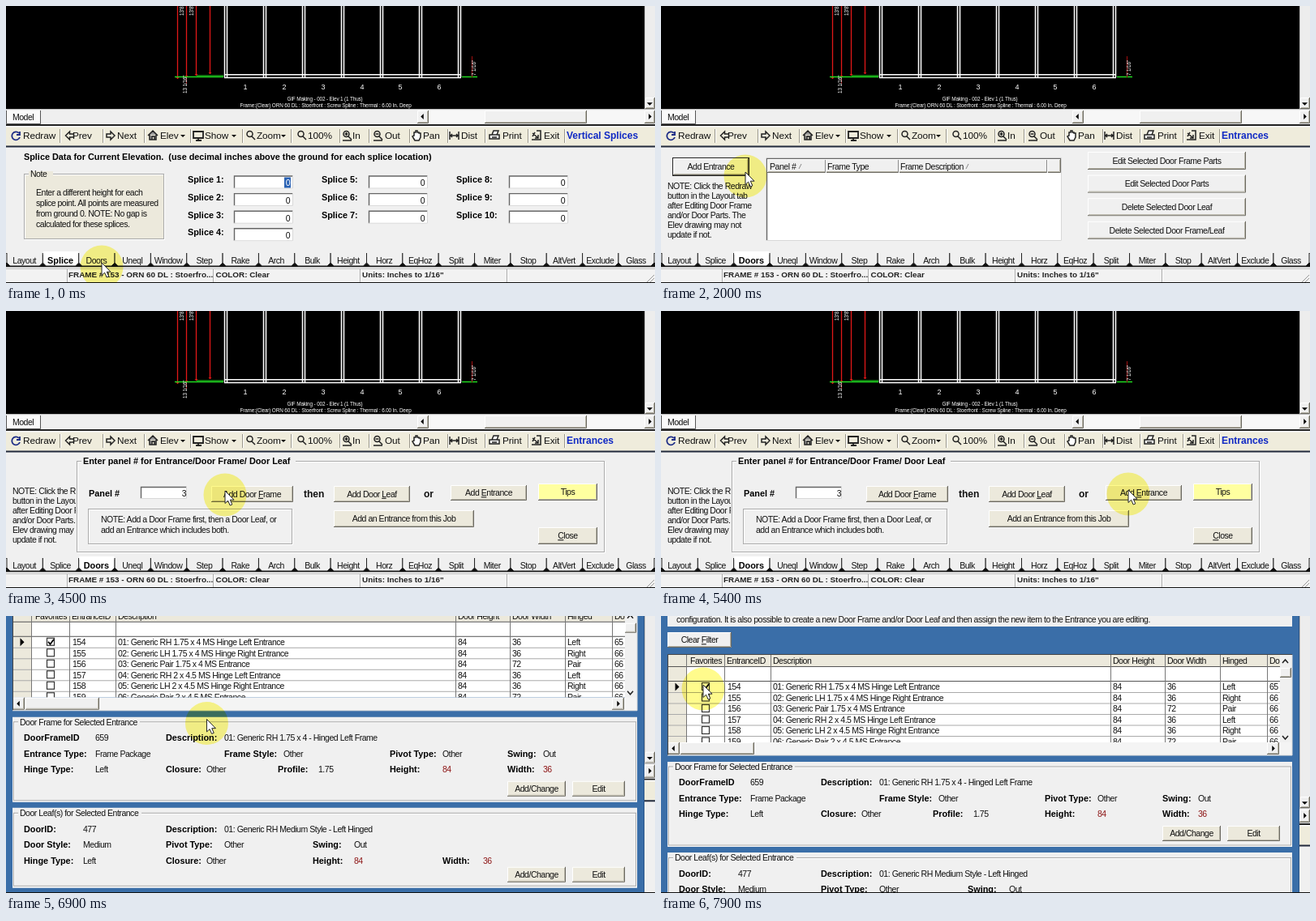
These frames come from a looping animation (800 by 342 pixels, 8000 ms). An HTML page:

```html
<!DOCTYPE html>
<html lang="en">
<head>
<meta charset="utf-8">
<title>Adding an entrance</title>
<style>
html, body { margin: 0; width: 100%; height: 100%; overflow: hidden; background: #f0f0f0; }
svg { display: block; width: 800px; height: 342px; }
text { font: 10.5px "Liberation Sans", Arial, sans-serif; letter-spacing: -.47px; fill: #111; white-space: pre; }
.b { font-weight: bold; font-size: 10.85px; letter-spacing: 0; fill: #000; }
.big { font-weight: bold; font-size: 12px; letter-spacing: 0; }
.status { font-weight: bold; font-size: 9.9px; letter-spacing: 0; fill: #222; }
.tool { font-size: 11.8px; letter-spacing: -.1px; }
.title { font-weight: bold; font-size: 12px; letter-spacing: 0; fill: #1029c4; }
.cad { font-size: 9px; letter-spacing: 0; fill: #fff; }
.tiny { font-size: 6.4px; letter-spacing: -.15px; fill: #fff; }
.red { fill: #8c1414; }
.inv { fill: #fff; }
.u { text-decoration: underline; }
.icon { fill: none; stroke: #222; stroke-width: 1.5; }
</style>
</head>
<body>
<svg id="stage" viewBox="0 0 800 342"></svg>
<script>
const LOOP = 8000;
const DOORS_AT = 500, DIALOG_AT = 2350, TYPED_AT = 4300, WINDOW_AT = 5900;
const FACE = '#ece9dc', PAGE = '#f0f0f0', BLUE = '#3a6ea8';
const SYSTEM = 'ORN 60 DL';

const rect = (x, y, w, h, fill, extra = '') =>
  `<rect x="${x}" y="${y}" width="${w}" height="${h}" fill="${fill}" ${extra}/>`;
const path = (d, stroke = '#000', fill = 'none', extra = '') =>
  `<path d="${d}" stroke="${stroke}" fill="${fill}" ${extra}/>`;
const group = (id, body, extra = '') => `<g id="${id}" ${extra}>${body}</g>`;
const repeat = (list, draw) => list.map(draw).join('');

// y is the middle of the line; an underscore underlines the next letter
const text = (x, y, s, cls = '', anchor = 'start') =>
  `<text x="${x}" y="${y + 3.8}" class="${cls}" text-anchor="${anchor}">` +
  s.replace(/_(.)/, '<tspan class="u">$1</tspan>') + '</text>';

const tri = (x, y, dir, r = 4, fill = '#000') =>
  `<path d="M${-r / 2},${-r}L${r / 2},0L${-r / 2},${r}Z" fill="${fill}" transform="translate(${x} ${y}) rotate(${dir})"/>`;

function raised(x, y, w, h, fill = FACE) {
  return rect(x, y, w, h, fill) +
    path(`M${x + .5},${y + h - .5}V${y + .5}H${x + w - .5}`, '#fff') +
    path(`M${x},${y + h - .5}H${x + w - .5}V${y}`, '#6c6a62') +
    path(`M${x + 1},${y + h - 1.5}H${x + w - 1.5}V${y + 1}`, '#b8b5a8');
}
function sunken(x, y, w, h, fill = '#fff') {
  return rect(x, y, w, h, fill) +
    path(`M${x + .5},${y + h - .5}V${y + .5}H${x + w - .5}`, '#666', 'none', 'stroke-width="1.4"') +
    path(`M${x},${y + h - .5}H${x + w - .5}V${y}`, '#d8d8d8');
}
const button = (x, y, w, h, label, fill) =>
  raised(x, y, w, h, fill) + text(x + w / 2, y + h / 2, label, '', 'middle');

function etched(x, y, w, h, legend = '', cls = '', legendWidth = 0, bg = PAGE) {
  const box = `x="${x + .5}" y="${y + .5}" width="${w}" height="${h}" fill="none"`;
  return `<rect ${box} stroke="#fff" transform="translate(1 1)"/><rect ${box} stroke="#aaa"/>` +
    (legend ? rect(x + 6, y - 3, legendWidth, 7, bg) + text(x + 8, y + .5, legend, cls) : '');
}
const lines = (x, y, step, list) => repeat(list, (s, i) => text(x, y + i * step, s));
const pairs = (y, list) => repeat(list, ([x, label, vx, value, cls]) =>
  text(x, y, label, 'b') + text(vx, y, value, cls));

function drawing() {
  const dims = repeat([[211, 90], [222, 88], [234, 86], [251, 84]], ([x, y]) =>
    path(`M${x + .5},0V${y}`, '#e01818', 'none', 'stroke-width="1.3"') + tri(x + .5, y - 1, 90, 2, '#e01818'));
  const upright = (x, y, s) => `<text class="tiny" transform="translate(${x} ${y}) rotate(-90)">${s}</text>`;
  const white = d => path(d, '#fff', 'none', 'stroke-width="1.5"');
  const mullion = i => 269.5 + 48 * i;
  return rect(0, 0, 787, 127, '#000') + dims +
    path('M208,87.5H268M562,87.5H581', '#20d820', 'none', 'stroke-width="1.4"') + path('M235,86H268', '#20d820') +
    path('M222.5,88V96M574.5,62V88', '#a01010') +
    upright(219, 12, "13'8 1/16\"") + upright(231, 12, "13'8\"") +
    upright(223, 108, '13 1/16"') + upright(579, 86, '7 1/16"') +
    repeat([0, 1, 2, 3, 4, 5, 6].map(mullion), x => white(`M${x},0V88M${x + 3},0V88`)) +
    white('M269,84.8H561M269,88.4H561') +
    repeat([295, 343, 391, 439, 486, 534], (x, i) => text(x, 99.5, `${i + 1}`, 'cad', 'middle')) +
    text(393, 113.5, 'GIF Making - 002 - Elev 1 (1 Thus)', 'tiny', 'middle') +
    text(394, 121, `Frame:(Clear) ${SYSTEM} : Stoerfront : Screw Spline : Thermal : 6.00 In. Deep`, 'tiny', 'middle');
}

function scrollbars() {
  return rect(787, -140, 13, 268, '#ededed') + path('M787.5,-140V128', '#bbb') +
    raised(788, 113, 12, 14, PAGE) + tri(793.5, 121, 90, 3.5) +
    rect(0, 127, 800, 20, '#efefef') + path('M0,127.5H800', '#bbb') +
    path('M.5,129V145.5H42.5V129', '#555', '#fafafa') + text(21, 137, 'Model', '', 'middle') +
    raised(507, 129, 14, 16, PAGE) + tri(513, 136.5, 180, 3.5) +
    rect(521, 129, 266, 16, '#f7f7f7') + raised(590, 129, 126, 16, PAGE) +
    raised(787, 129, 13, 16, PAGE) + tri(794, 136.5, 0, 3.5);
}

function toolbar() {
  const icon = (x, d, extra = '') => `<path class="icon" transform="translate(${x} 160)" d="${d}" ${extra}/>`;
  const lens = 'M1,1L5,5M2,-2A3.5,3.5 0 1 1 -5,-2A3.5,3.5 0 1 1 2,-2';
  const arrow = 'M5,-2H0V-5L-5,0L0,5V2H5Z';
  const items = [[21, 'Redraw'], [82, 'Prev'], [137, 'Next'], [190, 'Elev'], [245, 'Show'], [309, 'Zoom'],
    [372, '100%'], [427, 'In'], [467, 'Out'], [514, 'Pan'], [561, 'Dist'], [612, 'Print'], [663, 'Exit']];
  return rect(0, 146, 800, 2, '#222') + rect(0, 148, 800, 25, '#efecdc') + rect(0, 148, 800, 1.5, '#fff') +
    rect(0, 172.5, 800, 2, '#222a3c') +
    repeat([66, 119, 170, 227, 291, 351, 411, 447, 497, 544, 590, 643, 688], x =>
      path(`M${x + .5},152V169`, '#9a978a') + path(`M${x + 1.5},152V169`, '#fff')) +
    repeat(items, ([x, s]) => text(x, 160, s, 'tool')) +
    repeat([218, 281, 342], x => tri(x, 160.5, 90, 3)) +
    icon(12, 'M4,-3A5,5 0 1 0 5,2M5,-5V-1H1', 'style="stroke:#1c2c86;stroke-width:1.8"') +
    icon(78.5, arrow) + icon(129, 'M-5,-2H0V-5L5,0L0,5V2H-5Z') +
    icon(181, 'M-6,0L0,-6L6,0M-4,-1V5H4V-1M-1,5V1H2V5', 'style="fill:#999"') +
    icon(237, 'M-6,-5H6V3H-6ZM-3,6H4M0,3V6', 'style="stroke-width:1.8"') +
    icon(302, lens) + icon(365, lens) + icon(421, lens + 'M-3.5,-2H.5M-1.5,-4V0M-6,6H5') +
    icon(459, lens + 'M-3.5,-2H.5M-6,6H5') +
    icon(506, 'M-2,6L-5,1L-3,0V-4H-1V-6H1V-4H3V-3H5V2L3,6Z', 'style="fill:#fff"') +
    icon(553, 'M-6,-5V5M5,-5V5M-5,0H4M-3,-2L-5,0L-3,2M2,-2L4,0L2,2') +
    icon(602, 'M-6,-1H6V4H-6ZM-3,-1L-1,-6H5L3,-1M-3,2H3', 'style="fill:#fff"') +
    icon(654, 'M-6,5H5V-6H0M-5,-3L2,3M2,-1V3H-2M-5,1L-2,-4');
}

const TABS = 'Layout Splice Doors Uneql Window Step Rake Arch Bulk Height Horz EqHoz Split Miter Stop AltVert Exclude Glass'.split(' ');
function tabs(active) {
  const step = 44.35;
  return rect(0, 304, 800, 14, PAGE) + rect(0, 317, 800, 5.5, '#111') + path('M0,305.5H800', '#555') +
    repeat(TABS, (name, i) => {
      const on = i === active, x = i * step + 1, end = i === 17 ? 799 : x + step;
      return path(`M${x},305V317L${x + 4},321H${end - 4}L${end},317V305`, '#222', on ? '#fff' : PAGE) +
        (on ? rect(x + .5, 303, end - x - 1, 4, '#fff') : '') +
        text((x + end) / 2 - .5, 313.8, name, on ? 'b' : '', 'middle');
    });
}

function statusBar() {
  return rect(0, 322.5, 800, 20, '#f2f2f2') + path('M0,324.5H800', '#c4c4c4') +
    repeat([76, 256, 437, 618], x => path(`M${x - .5},325V341`, '#aaa') + path(`M${x + .5},325V341`, '#fff')) +
    text(77, 331.5, `FRAME # 153 - ${SYSTEM} : Stoerfro...`, 'status') +
    text(258.5, 331.5, 'COLOR: Clear', 'status') + text(439, 331.5, 'Units: Inches to 1/16"', 'status') +
    path('M790,341L799,332M794,341L799,336', '#999');
}

function splicePage() {
  const columns = [[224, 281, 4], [389, 447, 3], [555, 620, 3]];
  let n = 0, out = '';
  for (const [x, fx, count] of columns)
    for (let r = 0; r < count; r++) {
      const y = 215.5 + r * 21.6, first = ++n === 1;
      out += text(x, y - 1, `Splice ${n}:`, 'b') + sunken(fx, y - 6, 73, 16) +
        (first ? rect(fx + 62, y - 4, 8, 13, '#2a62b4') : '') +
        text(fx + 69, y + 3, '0', first ? 'inv' : '', 'end');
    }
  return text(22, 186, 'Splice Data for Current Elevation.  (use decimal inches above the ground for each splice location)', 'b') +
    rect(22, 207, 173, 81, FACE) + etched(22, 207, 172, 80, 'Note', '', 30, FACE) +
    lines(37, 230, 13, ['Enter a different height for each', 'splice point. All points are measured',
      'from ground 0. NOTE: No gap is', 'calculated for these splices.']) + out + text(691, 160, 'Vertical Splices', 'title');
}

function doorsPage() {
  const edits = ['Edit Selected Door Frame Parts', 'Edit Selected Door Parts', 'Delete Selected Door Leaf', 'Delete Selected Door Frame/Leaf'];
  return text(691, 160, 'Entrances', 'title') +
    lines(8, 222, 12, ['NOTE: Click the Redraw', 'button in the Layout tab', 'after Editing Door Frame',
      'and/or Door Parts. The', 'Elev drawing may not', 'update if not.']) +
    group('entrances', rect(14, 187, 95, 23, '#222') + button(15, 188, 93, 21, 'Add Entrance', PAGE) +
      sunken(130, 188, 364, 102) + raised(131, 189, 362, 17, PAGE) +
      repeat([202, 292, 475], x => path(`M${x + .5},190V206`, '#888') + path(`M${x + 1.5},190V206`, '#fff')) +
      text(134, 198, 'Panel #') + text(205, 198, 'Frame Type') + text(295, 198, 'Frame Description') +
      path('M170,201L173,195M376,201L379,195', '#888') +
      repeat(edits, (s, i) => button(526, 180 + i * 28.6, 195, 22, s, PAGE)));
}

function panelDialog() {
  return rect(86, 176, 654, 125, PAGE) + etched(87, 185, 650, 112, 'Enter panel # for Entrance/Door Frame/ Door Leaf', 'b', 264) +
    text(102, 225, 'Panel #', 'b') + sunken(166, 217, 57, 15) +
    group('zero', rect(216, 218, 6, 13, '#2a62b4') + text(222, 225, '0', 'inv', 'end')) +
    group('three', text(222, 225.5, '3', '', 'end')) +
    button(253, 216, 101, 20, 'Add Door _Frame') + text(367, 226, 'then', 'big') +
    button(404, 216, 94, 20, 'Add Door _Leaf') + text(515, 226, 'or', 'big') +
    button(548, 215, 94, 19, 'Add _Entrance') + button(656, 213, 73, 21, 'Tips', '#ffffa0') +
    button(404, 246, 173, 21, 'Add an Entrance from this Job') + button(656, 267, 73, 21, '_Close') +
    etched(101, 244, 251, 43) + lines(117, 257, 13, ['NOTE: Add a Door Frame first, then a Door Leaf, or', 'add an Entrance which includes both.']);
}

function grid() {
  const stops = [31, 78, 135, 554, 621, 689, 747];
  const heads = [[36, 'Favorites'], [81, 'EntranceID'], [138, 'Description'], [557, 'Door Height'], [624, 'Door Width'], [692, 'Hinged'], [750, 'Do']];
  const sizes = ['1.75 x 4', '2 x 4.5'];
  const kinds = [['RH', ' Hinge Left', 36, 'Left'], ['LH', ' Hinge Right', 36, 'Right'], ['Pair', '', 72, 'Pair']];
  let rows = '';
  for (let i = 0; i < 6; i++) {
    const y = -22.5 + i * 13.5, [hand, hinge, width, side] = kinds[i % 3];
    rows += path(`M8,${y + 7}H763`, '#aaa') + rect(50.5, y - 5, 9, 9, '#fff', 'stroke="#333" stroke-width="1.2"') +
      text(82, y, `${154 + i}`) +
      text(138, y, `0${i + 1}: Generic ${hand} ${sizes[i / 3 | 0]} MS${hinge} Entrance`) +
      text(557, y, '84') + text(624, y, `${width}`) + text(692, y, side) + text(750, y, i ? '66' : '65');
  }
  const body = rect(8, -62, 755, 108, '#fff') + rect(8, -62, 755, 14, FACE) + rect(8, -62, 23, 108, FACE) +
    path('M8,-47.5H763M8,-29.5H763', '#555') + rows +
    repeat(stops, x => path(`M${x + .5},-62V46`, '#777')) +
    repeat(heads, ([x, s]) => text(x, -55, s)) +
    tri(20, -22.5, 0, 5) + path('M52,-23L54.5,-20L59,-26', '#000', 'none', 'stroke-width="1.8"');
  return `<clipPath id="cells"><rect x="8" y="-62" width="755" height="108"/></clipPath><g clip-path="url(#cells)">${body}</g>` +
    rect(763, -62, 15, 124, PAGE) + raised(763, -46, 14, 12, PAGE) +
    path('M766,-52L769.5,-56L773,-52M766,38L769.5,42L773,38', '#222', 'none', 'stroke-width="1.5"') +
    rect(8, 46, 770, 16, '#f4f4f4') + raised(8, 46, 15, 15, PAGE) + tri(15, 53.5, 180, 3.5) +
    raised(24, 46, 91, 15, PAGE) + raised(747, 46, 15, 15, PAGE) + tri(755, 53.5, 0, 3.5) +
    path('M8.5,62V-62.5H778', '#444') + path('M8,62H778V-62', '#ddd');
}

function entranceWindow() {
  const actions = y => button(618, y, 72, 19, 'Add/Change') + button(698, y, 65, 19, 'Edit');
  return rect(0, -140, 787, 460, BLUE) + path('M786.5,-140V320M0,319.5H787', '#2b5688') +
    rect(8, -140, 770, 43, PAGE) +
    text(19, -106, 'configuration. It is also possible to create a new Door Frame and/or Door Leaf and then assign the new item to the Entrance you are editing.') +
    button(8, -90, 79, 19, 'Clear _Filter', PAGE) + grid() +
    rect(8, 70, 770, 105, PAGE) + etched(9, 75.5, 767, 97, 'Door Frame for Selected Entrance', '', 150) +
    pairs(95, [[22, 'DoorFrameID', 110, '659'], [197, 'Description:', 269, '01: Generic RH 1.75 x 4 - Hinged Left Frame']]) +
    pairs(115, [[22, 'Entrance Type:', 110, 'Frame Package'], [269, 'Frame Style:', 342, 'Other'],
      [473, 'Pivot Type:', 538, 'Other'], [618, 'Swing:', 662, 'Out']]) +
    pairs(134.5, [[22, 'Hinge Type:', 110, 'Left'], [197, 'Closure:', 247, 'Other'], [335, 'Profile:', 385, '1.75'],
      [473, 'Height:', 538, '84', 'red'], [618, 'Width:', 662, '36', 'red']]) + actions(149) +
    rect(8, 182, 770, 99, PAGE) + etched(9, 188, 767, 90, 'Door Leaf(s) for Selected Entrance', '', 152) +
    pairs(208, [[22, 'DoorID:', 95, '477'], [197, 'Description:', 269, '01: Generic RH Medium Style - Left Hinged']]) +
    pairs(227.5, [[22, 'Door Style:', 95, 'Medium'], [197, 'Pivot Type:', 269, 'Other'], [378, 'Swing:', 429, 'Out']]) +
    pairs(247, [[22, 'Hinge Type:', 95, 'Left'], [197, 'Closure:', 247, 'Other'],
      [378, 'Height:', 429, '84', 'red'], [538, 'Width:', 588, '36', 'red']]) + actions(255) +
    sunken(8, 293, 226, 20, '#f6f6f6') +
    repeat([9, 26, 197, 215], x => raised(x, 294, 17, 18, PAGE)) +
    tri(18.5, 303, 180, 5) + tri(34, 303, 180, 5) + tri(206, 303, 0, 5) + tri(222, 303, 0, 5) +
    path('M13.5,298V308M227.5,298V308', '#000', 'none', 'stroke-width="2"') +
    text(46, 303, 'Entrance Count = 153') +
    button(254, 293, 81, 20, '_Add New', PAGE) + button(342, 293, 80, 20, '_Delete', PAGE) +
    button(611, 293, 79, 20, '_Select', PAGE) + button(698, 293, 80, 20, '_Cancel', PAGE);
}

const world = rect(0, 174, 800, 150, PAGE) + drawing() + scrollbars() + toolbar() +
  group('splice', splicePage() + tabs(1)) + group('doors', doorsPage() + tabs(2)) +
  group('dialog', panelDialog()) + statusBar() + group('window', entranceWindow());

document.getElementById('stage').innerHTML = group('world', world) + rect(0, 341, 800, 1, '#111') +
  '<circle id="halo" r="26.5" fill="#fffb8c" style="mix-blend-mode:multiply"/>' +
  group('arrow', path('M0,0V15.5L3.6,12.2L6.2,18L8.8,16.9L6.3,11.2H11Z', '#222', '#fff')) +
  group('beam', path('M-3.5,-7.5H-1L0,-6.5L1,-7.5H3.5M0,-6.5V6.5M-3.5,7.5H-1L0,6.5L1,7.5H3.5', '#222', 'none', 'stroke-width="1.4"'));

const el = id => document.getElementById(id);
const show = (id, on) => { el(id).style.display = on ? '' : 'none'; };
const move = (id, x, y) => el(id).setAttribute('transform', `translate(${x.toFixed(2)} ${y.toFixed(2)})`);

// keys are [time, ...values], eased between neighbours
function tween(keys, t) {
  const i = keys.findIndex(k => k[0] > t);
  if (i === 0) return keys[0].slice(1);
  if (i < 0) return keys[keys.length - 1].slice(1);
  const a = keys[i - 1], b = keys[i], u = (t - a[0]) / (b[0] - a[0]), e = u * u * (3 - 2 * u);
  return a.slice(1).map((v, k) => v + (b[k + 1] - v) * e);
}

const POINTER = [[0, 118, 317], [1000, 118, 317], [1800, 115, 213], [2000, 104, 205], [2700, 108, 208],
  [3200, 187, 219], [3650, 209, 221], [4100, 209, 221], [4500, 270, 222], [5000, 440, 232], [5400, 576, 221],
  [5900, 576, 221], [6400, 561, 220], [7200, 103.5, 85], [7800, 52, 85]];
const CAMERA = [[6500, 0], [7200, 90], [7700, 110]];

function update(t) {
  const [x, y] = tween(POINTER, t), [pan] = tween(CAMERA, t);
  const overField = t >= DIALOG_AT && t < WINDOW_AT && x > 166 && x < 223 && y > 212 && y < 232;
  show('splice', t < DOORS_AT);
  show('doors', t >= DOORS_AT);
  show('entrances', t < DIALOG_AT);
  show('dialog', t >= DIALOG_AT);
  show('zero', t < TYPED_AT);
  show('three', t >= TYPED_AT);
  show('window', t >= WINDOW_AT);
  show('arrow', !overField);
  show('beam', overField);
  move('world', 0, pan);
  move('halo', x, y + (overField ? 0 : 5));
  move('arrow', x, y);
  move('beam', x, y);
}

const start = performance.now();
function tick() {
  update((performance.now() - start) % LOOP);
  requestAnimationFrame(tick);
}
tick();
</script>
</body>
</html>
```
